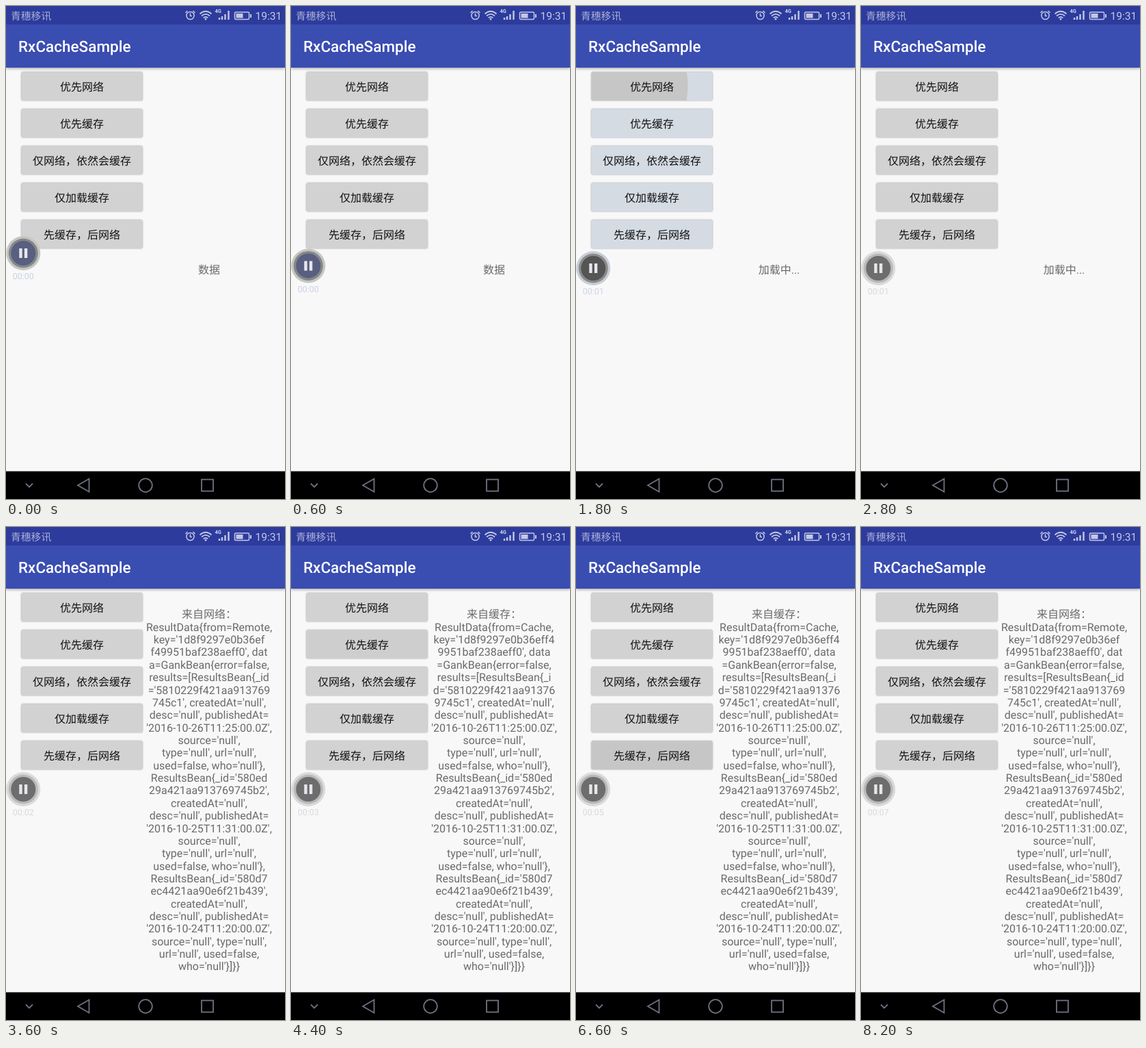
These frames come from a looping animation (408 by 720 pixels, 8.4 s). An HTML page:

```html
<!DOCTYPE html>
<html lang="zh-CN">
<head>
<meta charset="utf-8">
<title>RxCacheSample</title>
<style>
html, body { margin: 0; width: 100%; height: 100%; overflow: hidden; background: #f8f8f8; }
svg { display: block; width: 408px; height: 720px; }
text {
  font: 16px Roboto, 'Noto Sans CJK SC', 'Noto Sans CJK', sans-serif;
  text-rendering: geometricPrecision;
}
.mid { text-anchor: middle; }
.line { fill: none; stroke: #6f7283; stroke-width: 1.8; }
.icon { fill: none; stroke: #c3c8e6; stroke-width: 1.5; }
.button { filter: drop-shadow(0 .6px 1.2px #999ca5); }
.label { font-weight: 500; fill: #111; }
#result { fill: #6a6a6a; }
</style>
</head>
<body>
<svg viewBox="0 0 408 720">
  <rect width="408" height="720" fill="#f8f8f8"/>
  <rect y="27" width="408" height="63" fill="#3a4db1" style="filter:drop-shadow(0 1px 2px #0006)"/>
  <rect width="408" height="27" fill="#2d3b9c"/>
  <text x="7" y="20" fill="#a9afd7" style="font-size:14.8px">青穗移讯</text>
  <text x="364.500" y="19.5" fill="#c3c8e6" style="font-size:15.6px">19:31</text>
  <text x="18" y="67" fill="#fff" style="font-size:22.5px;font-weight:500">RxCacheSample</text>

  <g class="icon">
    <circle cx="269.5" cy="14" r="5.6"/>
    <path d="M269.5 10.5V14.5H272M262.5 10L265.5 7M276.5 10L273.5 7"/>
    <path d="M283.5 11.5Q292 4 300.5 11.5M286 14.5Q292 9.3 298 14.5M288.7 17.3Q292 14.5 295.3 17.3" stroke-width="1.8"/>
    <path d="M312 20V17M316 20V15M320.5 20V12M325.5 20V7" stroke-width="2.4"/>
    <rect x="334.5" y="9" width="21" height="10.5" rx="1.5"/>
    <path d="M358 12V17" stroke-width="2"/>
  </g>
  <rect x="336.5" y="11" width="10" height="6.5" fill="#c3c8e6"/>
  <circle cx="292" cy="19" r="1.5" fill="#c3c8e6"/>
  <text x="305.5" y="10" fill="#d5d9ef" style="font-size:7.5px;font-weight:700">4G</text>

  <g id="buttons"></g>
  <g id="result" class="mid"></g>

  <circle id="dot" r="10.5" fill="#b8bfdf"/>
  <g id="recorder">
    <circle r="25"/><circle r="21.5"/><circle r="18"/>
    <path d="M-3.8 -7V7M3.8 -7V7" stroke="#e6e7ec" stroke-width="4.4"/>
    <text class="mid" y="38.3" style="font-size:12.5px"></text>
  </g>

  <rect y="679.5" width="408" height="41"/>
  <g class="line">
    <path d="M29 697.5L34 702.5L39 697.5"/>
    <path d="M121.5 690.5V709.5L105 700Z"/>
    <circle cx="204" cy="700" r="9.8"/>
    <rect x="286" y="691.5" width="17" height="17"/>
  </g>
</svg>
<script>
const LOOP = 8400, STEP = 200, PITCH = 54;
const $ = id => document.getElementById(id);
const clamp = v => Math.max(0, Math.min(1, v));

const labels = ['优先网络', '优先缓存', '仅网络，依然会缓存', '仅加载缓存', '先缓存，后网络'];
$('buttons').innerHTML = labels.map((label, i) => {
  const box = `x="22.5" y="${96.5 + i * PITCH}" width="177" height="41.5" rx="2"`;
  return `<clipPath id="clip${i}"><rect ${box}/></clipPath>
    <rect class="button" ${box}/>
    <circle class="ripple" cx="59" cy="${117 + i * PITCH}" fill="#c6c6c6" clip-path="url(#clip${i})"/>
    <text class="label mid" x="111" y="${123.6 + i * PITCH}">${label}</text>`;
}).join('');
const faces = document.querySelectorAll('.button');
const ripples = document.querySelectorAll('.ripple');

const tail = `desc='null', publishedAt=
'2016-10-26T11:25:00.0Z',
source='null',
type='null', url='null',
used=false, who='null'},
ResultsBean{_id='580ed
29a421aa913769745b2',
createdAt='null',
desc='null', publishedAt=
'2016-10-25T11:31:00.0Z',
source='null',
type='null', url='null',
used=false, who='null'},
ResultsBean{_id='580d7
ec4421aa90e6f21b439',
createdAt='null',
desc='null', publishedAt=
'2016-10-24T11:20:00.0Z',
source='null', type='null',
url='null', used=false,
who='null'}]}}`;
const cache = `来自缓存：
ResultData{from=Cache,
key='1d8f9297e0b36eff4
9951baf238aeff0', data
=GankBean{error=false,
results=[ResultsBean{_i
d='5810229f421aa91376
9745c1', createdAt='null',
` + tail;
const remote = `来自网络：
ResultData{from=Remote,
key='1d8f9297e0b36ef
f49951baf238aeff0', dat
a=GankBean{error=false,
results=[ResultsBean{_id
='5810229f421aa913769
745c1', createdAt='null',
` + tail;

// [start ms, value]
const messages = [[0, '数据'], [1000, '加载中...'], [3200, remote], [4200, cache],
  [5000, remote], [6000, cache], [7200, remote]];
const seconds = [[0, 0], [800, 1], [3200, 2], [4200, 3], [5000, 4], [6000, 5], [7000, 6], [8200, 7]];
// button face, recorder rings from outside in, timer
const tones = [
  [0, ['#d2d2d2', '#c4c7bf', '#85878b', '#595f80', '#cbd2e6']],
  [1400, ['#d4dbe3', '#c8ced8', '#8c8c8c', '#555', '#cdd5e1']],
  [2400, ['#d2d2d2', '#dadada', '#b9b9b9', '#6d6d6d', '#d6d9df']]
];
// start and growth time of the press on each button
const presses = [[1200, 900], [3800, 400], [4600, 300], [5800, 300], [6200, 400]];
const FADE = 300;
const at = (list, t) => list.findLast(([start]) => start <= t)[1];

let shown;
function showMessage(message) {
  if (message === shown) return;
  shown = message;
  const lines = message.split('\n');
  const top = lines.length > 1 ? 133.4 : 391;
  $('result').innerHTML = lines.map((line, i) =>
    `<text x="297" y="${top + i * 18.36}">${line}</text>`).join('');
}

function draw(t) {
  const [face, ...rest] = at(tones, t);
  faces.forEach(f => f.setAttribute('fill', face));

  const touched = presses.findIndex(([start]) => t >= start && t < start + STEP);
  $('dot').style.display = touched < 0 ? 'none' : '';
  $('dot').setAttribute('transform', `translate(59 ${117 + Math.max(0, touched) * PITCH})`);
  presses.forEach(([start, grow], i) => {
    ripples[i].setAttribute('r', 157 * clamp((t - start) / grow));
    ripples[i].setAttribute('opacity', 1 - clamp((t - start - grow) / FADE));
  });

  const slide = 1 - (1 - clamp(t / 1000)) ** 2;
  const recorder = $('recorder');
  recorder.setAttribute('transform', `translate(25.3 ${361 + 22 * slide})`);
  recorder.querySelectorAll('circle, text').forEach((el, i) => el.setAttribute('fill', rest[i]));
  recorder.querySelector('text').textContent = '00:0' + at(seconds, t);

  showMessage(at(messages, t));
}

const begin = performance.now();
function tick() {
  const t = (performance.now() - begin) % LOOP;
  draw(Math.floor(t / STEP) * STEP);
  requestAnimationFrame(tick);
}
tick();
</script>
</body>
</html>
```
